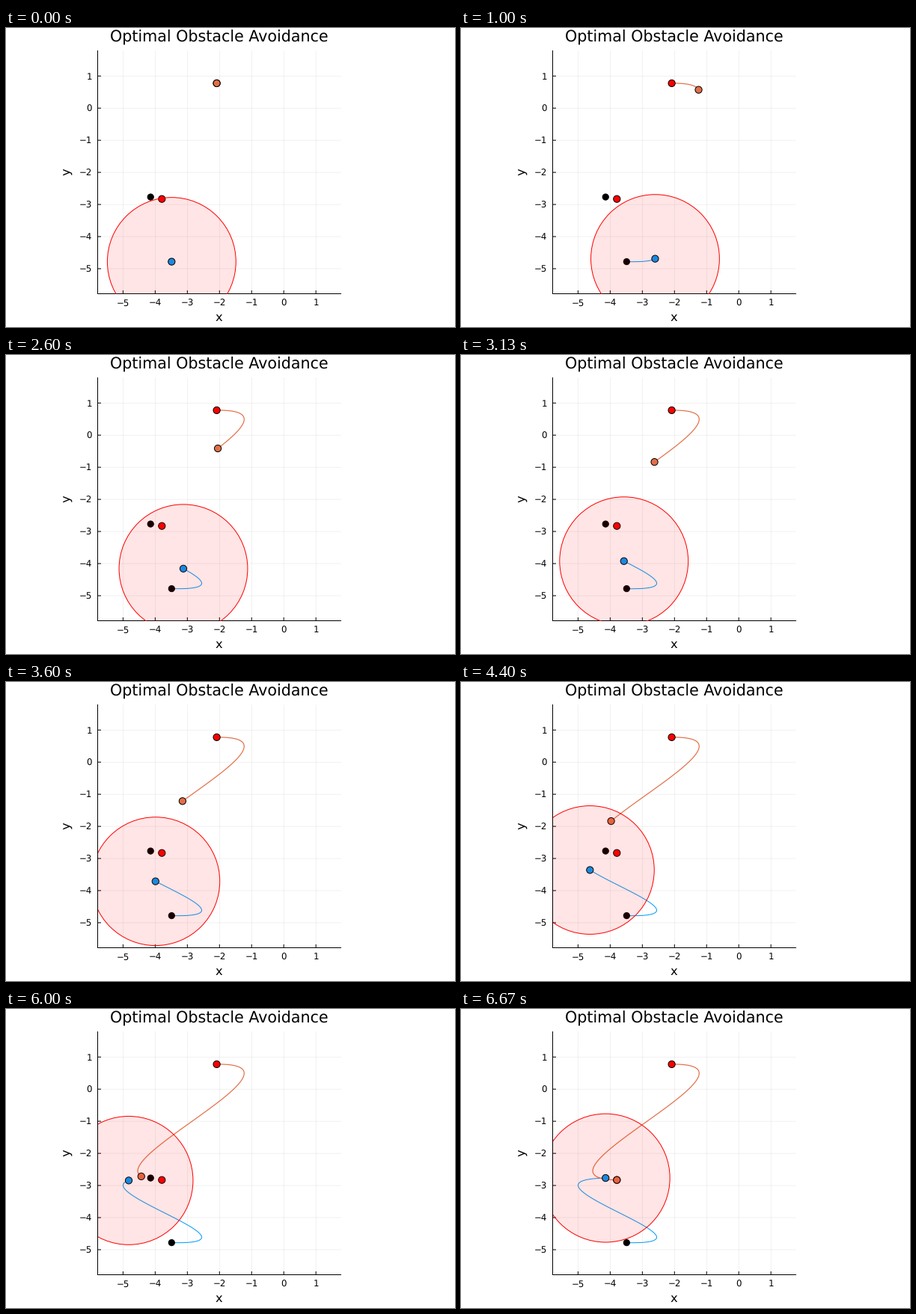
Recreate the animation shown at these times as a matplotlib script. Size 600 px wide and 400 px high, loop 6.74 s.

```python
import numpy as np
import matplotlib.pyplot as plt
from matplotlib.animation import FuncAnimation
from matplotlib.patches import Circle, Rectangle

W, H, DPI = 600, 400, 100
STEPS, FPS = 101, 15
TICK, LOOP = 20, 6740
LEFT, TOP, RIGHT, BOTTOM = 122.5, 30.5, 447.5, 355.5
UNIT = 42.96
X0, Y0 = 371.2, 107.2
RADIUS = 2 * UNIT
BLUE, ORANGE = "#009afa", "#e36f47"
PT = 72 / DPI

plt.rcParams["font.family"] = "DejaVu Sans"
plt.rcParams["text.hinting"] = "none"

fig = plt.figure(figsize=(W / DPI, H / DPI), dpi=DPI, facecolor="white")
ax = fig.add_axes([0, 0, 1, 1])
ax.set_xlim(0, W)
ax.set_ylim(H, 0)
ax.axis("off")


def cubic_path(xs, ys):
    """Minimum-energy motion: one cubic per axis through the waypoints."""
    knots = np.array([0, 15, 39, 54, 66, 78, 100]) / 100
    s = np.linspace(0, 1, STEPS)
    return [np.polyval(np.polyfit(knots, v, 3), s) for v in (xs, ys)]


def line(xs, ys, color="black", width=1.0, **kw):
    return ax.plot(xs, ys, color=color, lw=width * PT, snap=False, **kw)[0]


def disc(x, y, radius, color, edge, z):
    return ax.add_patch(Circle((x, y), radius, fc=color, ec=edge,
                               lw=PT, zorder=z))


def dot(x, y, color, z, radius=4.6):
    return disc(x, y, radius, color, "black", z)


def label(x, y, text, px, ha="center", **kw):
    ax.text(x, y, text, fontsize=px * PT, ha=ha, va="baseline", **kw)


def draw_axes():
    for v in range(-5, 2):
        x, y = X0 + UNIT * v, Y0 - UNIT * v
        name = str(v).replace("-", "\u2212")
        line([x, x], [TOP, BOTTOM], width=0.55, alpha=0.1, zorder=1)
        line([LEFT, RIGHT], [y, y], width=0.55, alpha=0.1, zorder=1)
        line([x, x], [BOTTOM, BOTTOM - 4], zorder=2)
        line([LEFT, LEFT + 4], [y, y], zorder=2)
        label(x, 371.4, name, 11.8)
        label(114.8, y + 4.3, name, 11.8, ha="right")
    line([LEFT, LEFT], [TOP, BOTTOM], zorder=2)
    line([LEFT, RIGHT], [BOTTOM, BOTTOM], zorder=2)
    label(285, 18.4, "Optimal Obstacle Avoidance", 20.7)
    label(284.6, 391.7, "x", 16.2)
    label(85.8, 192.2, "y", 16.2, rotation=90, rotation_mode="anchor")


draw_axes()

bx, by = cubic_path([221.3, 259.5, 237.0, 199.7, 172.3, 157.3, 193.2],
                    [312.8, 308.2, 286.0, 267.0, 251.4, 238.2, 226.2])
ox, oy = cubic_path([281.6, 317.5, 283.0, 236.0, 200.5, 178.7, 208.3],
                    [73.9, 82.7, 125.0, 159.3, 186.0, 208.8, 228.7])

blue_trail = line([], [], BLUE, zorder=3)
orange_trail = line([], [], ORANGE, 1.2, zorder=3)
for end in (0, -1):
    dot(bx[end], by[end], "black", 4, 4.1)
    dot(ox[end], oy[end], "red", 4)
blue_dot = dot(bx[0], by[0], BLUE, 5)
orange_dot = dot(ox[0], oy[0], ORANGE, 5)

zone = disc(bx[0], by[0], RADIUS, (1, 0, 0, 0.1), "red", 6)
zone.set_clip_path(Rectangle((LEFT, TOP), RIGHT - LEFT, BOTTOM - TOP,
                             transform=ax.transData))


def update(tick):
    # motion advances at 15 steps per second, sampled mid-tick
    ms = (tick + 0.5) * TICK
    k = min(int((ms + 4) * FPS / 1000), STEPS - 1)
    blue_trail.set_data(bx[:k + 1], by[:k + 1])
    orange_trail.set_data(ox[:k + 1], oy[:k + 1])
    blue_dot.center = zone.center = bx[k], by[k]
    orange_dot.center = ox[k], oy[k]
    return blue_trail, orange_trail, blue_dot, orange_dot, zone


anim = FuncAnimation(fig, update, frames=LOOP // TICK, interval=TICK,
                     init_func=lambda: update(0), repeat=True, repeat_delay=0)
plt.show()
```
